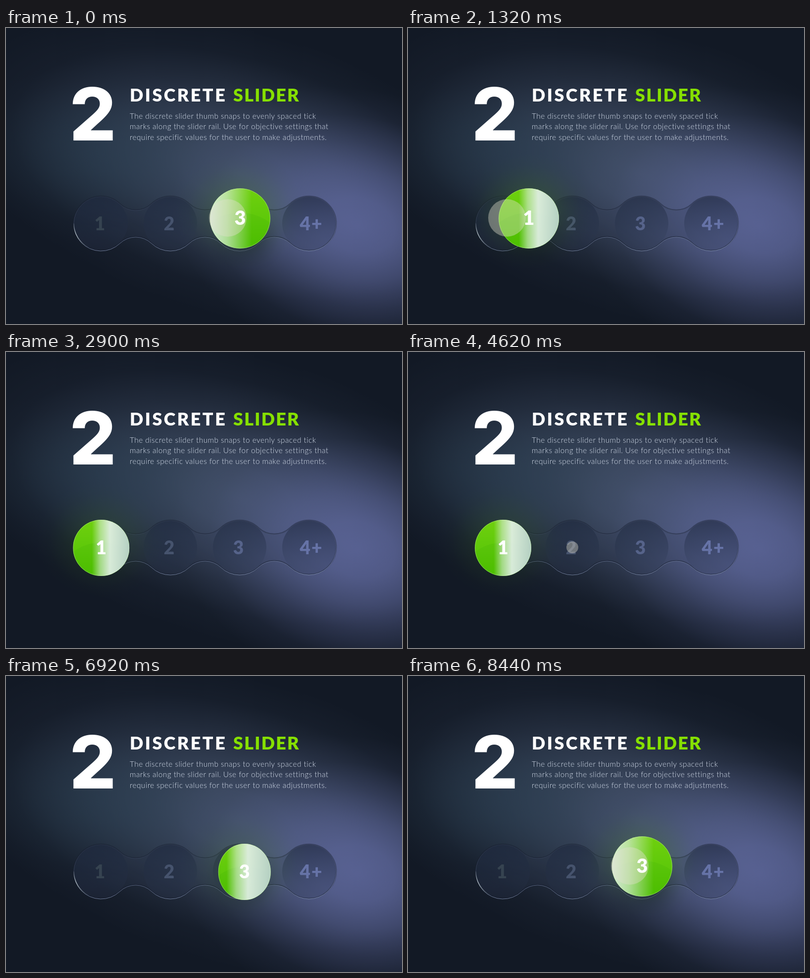
An HTML page with a canvas that plays this animation: 800x600 px, repeating every 8.48 s.

```html
<!DOCTYPE html>
<html lang="en">
<head>
<meta charset="utf-8">
<title>Discrete slider</title>
<style>
html, body { margin: 0; width: 100%; height: 100%; overflow: hidden; background: #121925; }
canvas { display: block; width: 100vw; height: 100vh; }
</style>
</head>
<body>
<canvas id="stage" width="800" height="600"></canvas>
<script>
const ctx = document.getElementById('stage').getContext('2d');
const LOOP = 8480, TAU = Math.PI * 2;
const RAIL_Y = 396, GAP = 140, stopX = i => 192 + GAP * i;
const TAP_SECOND = 4620, TAP_THIRD = 6240, TAP_DELAY = 200;
const PRESS = 8060, RELEASE = 1900;

const clamp = v => Math.min(1, Math.max(0, v));
const mix = (a, b, p) => a + (b - a) * p;

function ramp(t, from, length) {
  const p = clamp((t - from) / length);
  return p * p * (3 - 2 * p);
}

// Damped spring from 0 to 1 that passes its goal by 7% after 480 ms.
function spring(t, from) {
  const p = Math.max(0, t - from) / 480;
  return 1 - Math.exp(-2.66 * p) * Math.cos(Math.PI * p);
}

function thumbAt(t) {
  const drag = ramp(t, 140, 840), release = spring(t, RELEASE + 60);
  const press = ramp(t, PRESS, 340);
  const starts = [TAP_SECOND, TAP_THIRD].map(s => s + TAP_DELAY);
  const [hop2, hop3] = starts.map(s => spring(t, s));
  const [turn2, turn3] = starts.map(s => ramp(t, s, 450));
  const lift = 1 - ramp(t, RELEASE, 340) + press;
  const radius = 57 + 4 * lift;
  return {
    x: mix(473, 244, drag) - 52 * release + GAP * (hop2 + hop3) + press,
    y: 397 - 11 * lift,
    rx: radius - GAP * .4 * Math.max(0, hop2 - 1, hop3 - 1),
    ry: radius,
    lift,
    leftShine: .95 * (1 - drag) + .4 * (turn2 - turn3) + .95 * press,
    rightShine: .95 * drag - .55 * turn2 + .8 * turn3 - 1.2 * press,
  };
}

function gradient(g, stops) {
  stops.forEach(([p, color]) => g.addColorStop(clamp(p), color));
  return g;
}
const vertical = (y0, y1, ...stops) => gradient(ctx.createLinearGradient(0, y0, 0, y1), stops);

function ellipse(x, y, rx, ry, fill) {
  ctx.beginPath();
  ctx.ellipse(x, y, rx, ry, 0, 0, TAU);
  ctx.fillStyle = fill;
  ctx.fill();
}

function softSpot(x, y, rx, ry, angle, rgb, alpha) {
  ctx.save();
  ctx.translate(x, y);
  ctx.rotate(angle);
  ctx.scale(rx, ry);
  const stops = [0, .2, .4, .6, .8, 1].map(p => [p, `rgba(${rgb},${alpha * (1 + Math.cos(Math.PI * p)) / 2})`]);
  ellipse(0, 0, 1, 1, gradient(ctx.createRadialGradient(0, 0, 0, 0, 0, 1), stops));
  ctx.restore();
}

function text(str, x, y, font, color, spacing = 0, align = 'left') {
  ctx.font = font;
  ctx.fillStyle = color;
  ctx.letterSpacing = spacing + 'px';
  ctx.textAlign = align;
  ctx.fillText(str, x, y);
}

function drawBackground() {
  ctx.fillStyle = '#121925';
  ctx.fillRect(0, 0, 800, 600);
  softSpot(470, 295, 590, 290, .28, '67,81,106', .92);
  softSpot(190, 255, 290, 180, .1, '43,66,84', .45);
  softSpot(710, 400, 380, 275, .25, '98,107,163', .8);
}

function drawHeading() {
  text('2', 175.5, 228, '800 148px Inter, sans-serif', '#fff', 0, 'center');
  const titleFont = '900 36px Lato, sans-serif';
  text('DISCRETE', 250, 148.5, titleFont, '#fff', 3.4);
  text('SLIDER', 459, 148.5, titleFont, '#86e000', 2.2);
  ['The discrete slider thumb snaps to evenly spaced tick',
   'marks along the slider rail. Use for objective settings that',
   'require specific values for the user to make adjustments.'].forEach((line, i) =>
    text(line, 250, 183.5 + i * 21.5, '300 15.5px Lato, sans-serif', '#d3dcea', .4));
}

// Four circles joined by concave fillets that touch them tangentially.
function railPath() {
  const R = 55, half = GAP / 2, drop = 73.5, fillet = Math.hypot(half, drop) - R;
  const a = Math.atan2(drop, half), PI = Math.PI;
  ctx.beginPath();
  for (let i = 0; i < 4; i++) {
    ctx.arc(stopX(i), RAIL_Y, R, PI + a, i === 3 ? 3 * PI - a : TAU - a);
    if (i < 3) ctx.arc(stopX(i) + half, RAIL_Y - drop, fillet, PI - a, a, true);
  }
  for (let i = 2; i >= 0; i--) {
    ctx.arc(stopX(i) + half, RAIL_Y + drop, fillet, -a, a - PI, true);
    ctx.arc(stopX(i), RAIL_Y, R, a, i ? PI - a : PI + a);
  }
  ctx.closePath();
}

function strokeRail(dy, width, style) {
  ctx.save();
  ctx.translate(0, dy);
  railPath();
  ctx.lineWidth = width;
  ctx.strokeStyle = style;
  ctx.stroke();
  ctx.restore();
}

function drawRail(covered) {
  railPath();
  ctx.fillStyle = 'rgba(45,56,82,.2)';
  ctx.fill();
  for (let i = 0; i < 4; i++) {
    ellipse(stopX(i), RAIL_Y, 54, 54,
      vertical(342, 450, [0, 'rgba(27,37,58,.55)'], [.5, 'rgba(32,44,68,.3)'], [1, 'rgba(50,64,95,.06)']));
  }
  strokeRail(0, 2.5, 'rgba(22,30,47,.42)');
  strokeRail(1, 1, vertical(341, 451, [0, 'rgba(110,125,160,.12)'], [.5, 'rgba(130,146,185,.3)'], [1, 'rgba(165,182,220,.62)']));

  ctx.beginPath();
  ctx.arc(stopX(0), RAIL_Y, 55, Math.PI * .65, Math.PI);
  ctx.lineWidth = 1.5;
  ctx.strokeStyle = vertical(396, 446, [0, 'rgba(225,238,240,.1)'], [.45, 'rgba(225,238,240,.7)'], [1, 'rgba(225,238,240,0)']);
  ctx.stroke();

  for (let i = 0; i < 4; i++) {
    if (i === covered) continue;
    const color = `rgb(${54 + 16 * i},${67 + 16 * i},${80 + 29 * i})`;
    const plus = i === 3;
    text(plus ? '4+' : String(i + 1), stopX(i) + (plus ? 5 : -2.5), 409.5,
      '900 37px Lato, sans-serif', color, plus ? 2 : 0, 'center');
  }
}

function drawThumb({ x, y, rx, ry, lift, leftShine, rightShine }) {
  softSpot(x, y - 14, 132, 118, 0, '70,130,25', .2 + .1 * lift);
  softSpot(x + 14 * lift, y + 14 + 24 * lift, 80, 76, 0, '18,28,35', .4);

  ctx.save();
  ctx.beginPath();
  ctx.ellipse(x, y, rx, ry, 0, 0, TAU);
  ctx.clip();
  const paint = fill => {
    ctx.fillStyle = fill;
    ctx.fillRect(x - rx, y - ry, rx * 2, ry * 2);
  };
  paint(vertical(y - ry, y + ry, [0, '#6fd00e'], [.5, '#5fc90a'], [1, '#50c200']));
  ellipse(x, y + ry * 1.15, rx * 1.5, ry * 1.34, 'rgba(50,165,0,.14)');

  // The further a shine reaches across the thumb, the more opaque it is.
  const across = (from, to, ...stops) => gradient(ctx.createLinearGradient(from, 0, to, 0), stops);
  const white = alpha => `rgba(230,239,239,${alpha})`;
  const left = Math.min(.9, clamp(leftShine)), right = Math.min(.9, Math.max(0, rightShine));
  paint(across(x - rx, x + rx * (1.4 * leftShine - .95), [0, white(left)], [.4, white(left * .7)], [1, white(0)]));
  const edge = 1 - 1.4 * rightShine;
  paint(across(x + rx * edge, x + rx * Math.max(1, edge + .01),
    [0, white(0)], [.22, white(right * .6)], [.48, white(right)], [1, `rgba(190,209,214,${right})`]));
  ctx.restore();

  ctx.beginPath();
  ctx.ellipse(x, y, rx - .5, ry - .5, 0, 0, TAU);
  ctx.lineWidth = 1;
  ctx.strokeStyle = 'rgba(225,245,210,.35)';
  ctx.stroke();
}

function drawTouch(t, x, y, from, until) {
  if (t < from || t >= until + 240) return;
  const radius = mix(12, 38, ramp(t, from, 140));
  ellipse(x, y, radius, radius, `rgba(225,222,205,${.4 * (1 - ramp(t, until, 240))})`);
}

function drawTouches(t) {
  [TAP_SECOND, TAP_THIRD].forEach((from, i) => drawTouch(t, stopX(i + 1), RAIL_Y, from, from + 240));
  drawTouch(t, mix(448, 200, ramp(t, 140, 860)), 385, PRESS - LOOP, RELEASE);
  drawTouch(t, 448, 385, PRESS, RELEASE + LOOP);
}

function draw(now) {
  const t = Math.floor((now % LOOP) / 20) * 20;
  const thumb = thumbAt(t);
  const selected = Math.round((thumb.x - stopX(0)) / GAP);
  const isOver = Math.abs(thumb.x - stopX(selected)) < 60;

  drawBackground();
  drawHeading();
  drawRail(isOver ? selected : -1);
  drawThumb(thumb);
  drawTouches(t);
  const size = 37 * thumb.ry / 57;
  text(String(selected + 1), thumb.x, thumb.y + size * .34, `900 ${size}px Lato, sans-serif`, '#fff', 0, 'center');
}

const start = performance.now();
function frame() {
  draw(performance.now() - start);
  requestAnimationFrame(frame);
}
frame();
</script>
</body>
</html>
```
